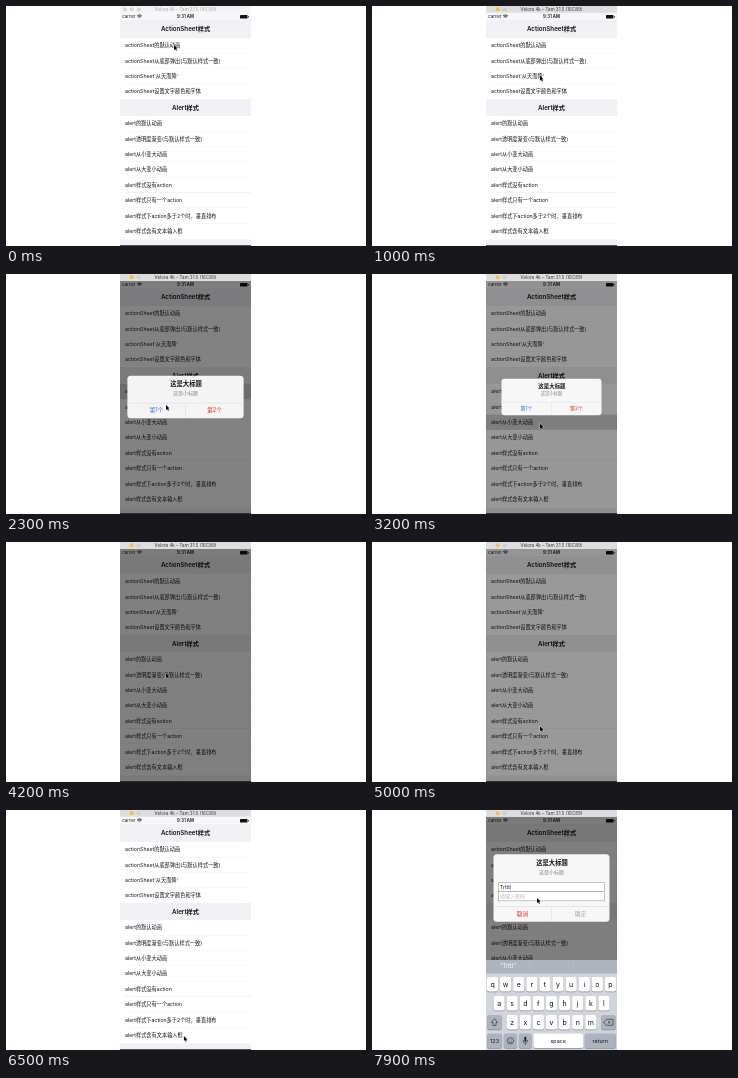
Recreate the animation shown at these times as an HTML page with a canvas. Size 360 px wide and 240 px high, loop 8000 ms.

```html
<!DOCTYPE html>
<html lang="zh">
<head>
<meta charset="utf-8">
<style>
html, body { margin: 0; width: 100%; height: 100%; overflow: hidden; background: #fff; }
canvas { display: block; width: 360px; height: 240px; }
</style>
</head>
<body>
<canvas></canvas>
<script>
const LOOP = 8000, STEP = 100, OPEN = 350, CLOSE = 170;
const L = 114, W = 131, R = L + W, MID = 179.5, ROW = 15.35;
const BLUE = '#2f6fe8', RED = '#f02a20', BLACK = '#111', GRAY = '#888', RULE = '#d4d4d4';
const FONT = 'Inter, "Noto Sans CJK SC", "Noto Sans CJK", sans-serif';
const ZOOM = 10; // large glyphs scaled down keep fractional spacing

const canvas = document.querySelector('canvas'), c = canvas.getContext('2d');
const dpr = window.devicePixelRatio || 1;
canvas.width = 360 * dpr;
canvas.height = 240 * dpr;

const clamp = v => Math.max(0, Math.min(1, v));
const easeOut = p => 1 - (1 - p) ** 2;
const smooth = p => p * p * (3 - 2 * p);

const sections = [
  { y: 14, head: 18, title: 'ActionSheet样式', rows: ['actionSheet的默认动画', 'actionSheet从底部弹出(与默认样式一致)',
    "actionSheet'从天而降'", 'actionSheet设置文字颜色和字体'] },
  { y: 93, head: 17, title: 'Alert样式', rows: ['alert的默认动画', 'alert透明度渐变(与默认样式一致)', 'alert从小变大动画',
    'alert从大变小动画', 'alert样式没有action', 'alert样式只有一个action',
    'alert样式下action多于2个时，垂直排布', 'alert样式含有文本输入框'] },
  { y: 233.6, head: 18, title: '自定义视图', rows: [] }
];
const rowTops = sections.flatMap(s => s.rows.map((_, i) => s.y + s.head + i * ROW));

// One demo per row: sheets slide, alerts scale in from the given size.
const demos = [
  { sheet: true }, { sheet: true }, { sheet: true, top: true }, { sheet: true, styled: true },
  { from: 1.1, buttons: 2 }, { from: 1, buttons: 2 }, { from: 0.25, solid: true, buttons: 2 }, { from: 1.4, buttons: 2 },
  { from: 1.1, buttons: 0 }, { from: 1.1, buttons: 1 }, { from: 1.1, buttons: 4 }, { from: 1.1, buttons: 2, form: true }
];
// Rows are pressed in order, at a slower pace from the seventh on.
const pressTime = i => 500 * Math.min(i, 6) + 720 * Math.max(0, i - 6);
demos.forEach((d, i) => {
  d.row = i;
  d.on = pressTime(i);
  d.tap = d.on + 0.62 * (pressTime(i + 1) - d.on);
  d.off = d.form ? LOOP : d.tap;
  d.press = [d.form ? 178 : 168, rowTops[i] + (d.sheet ? 7 : 9)];
  if (d.sheet) d.target = [178, 231];
  else if (d.form) d.target = [165, 88];
  else d.target = d.buttons > 1 ? [160, 131] : d.press; // a tap outside closes the others
});

function text(s, x, y, size, color = BLACK, align = 'center', weight = 400) {
  c.save();
  c.translate(x, y);
  c.scale(1 / ZOOM, 1 / ZOOM);
  c.font = `${weight} ${size * ZOOM}px ${FONT}`;
  c.textAlign = align;
  c.textBaseline = 'middle';
  c.fillStyle = color;
  c.fillText(s, 0, 0);
  const width = c.measureText(s).width / ZOOM;
  c.restore();
  return width;
}
function box(x, y, w, h, color, r = 0) {
  c.fillStyle = color;
  c.beginPath();
  c.roundRect(x, y, w, h, r);
  c.fill();
}
function dot(x, y, r, color) {
  c.fillStyle = color;
  c.beginPath();
  c.arc(x, y, r, 0, 7);
  c.fill();
}
function outline(d, x, y, width = 0.6) {
  c.save();
  c.translate(x, y);
  c.strokeStyle = '#222';
  c.lineWidth = width;
  c.stroke(new Path2D(d));
  c.restore();
}

function drawTitleBar(active) {
  box(L, 0, W, 6.8, active ? '#dedede' : '#f4f4f4');
  const lights = active ? ['#e2dcdc', '#fdbe41', '#cfcfcf'] : Array(3).fill('#d6d6d6');
  lights.forEach((color, i) => dot(118.7 + i * 7, 3.2, 2, color));
  text('Velora 4k – Tam 31.5 (16C89)', MID, 3.5, 4.5, active ? '#333' : '#aaa');
}

function drawStatus() {
  box(L, 6.8, W, 7.2, '#f7f7f9');
  text('Carrier', 116, 10.8, 4.1, BLACK, 'left');
  c.strokeStyle = BLACK;
  c.lineWidth = 0.7;
  for (const r of [1.2, 2.4, 3.5]) {
    c.beginPath();
    c.arc(133.5, 12.4, r, -2.35, -0.8);
    c.stroke();
  }
  text('9:31 AM', MID, 10.8, 4.3, BLACK, 'center', 600);
  box(234, 9, 7.5, 3.6, BLACK, 0.7);
  box(242, 10.1, 0.7, 1.4, BLACK);
}

function drawList(selected) {
  box(L, 14, W, 226, '#fff');
  let index = 0;
  for (const { y, head, title, rows } of sections) {
    box(L, y, W, head, '#f0f0f5');
    text(title, MID, y + head / 2 + 0.3, 6.2, BLACK, 'center', 600);
    rows.forEach((label, i) => {
      const top = rowTops[index];
      if (index++ === selected) box(L, top, W, ROW, '#d4d4d6');
      text(label, 119, top + ROW / 2 + 0.2, 5.2, BLACK, 'left');
      if (i < rows.length - 1) box(119, top + ROW - 0.4, R - 119, 0.3, '#e6e6e9');
    });
  }
}

function drawSheet(d, shown) {
  const head = d.styled ? 38.5 : 24, h = head + 68.5, mid = W / 2;
  c.save();
  c.translate(L, d.top ? 7 - h * (1 - shown) : 240 - h * shown);
  box(0, 0, W, h, '#fafafa');
  if (d.styled) {
    text('这是大标题', mid, 14.8, 17.3, '#f8231c');
    text('这是小标题', mid, 30.5, 4.6, '#5b87e8');
  } else {
    text('这是大标题', mid, 8.5, 6.3, BLACK, 'center', 600);
    text('这是小标题', mid, 17, 5, GRAY);
  }
  const colors = d.styled ? [BLACK, '#ef9140', BLACK] : [BLUE, RED, BLUE];
  colors.forEach((color, i) => {
    const y = head + i * 16;
    box(0, y, W, 0.4, RULE);
    text(`第${i + 1}个`, mid, y + 8.4, d.styled && i < 2 ? 4.1 : 6, color);
  });
  box(0, head + 48, W, 3.5, '#e2e2e4');
  text('取消', mid, head + 60, 6, d.styled ? BLACK : RED);
  c.restore();
}

const keyboardShown = (d, t) => smooth(clamp((t - d.on - 200) / 300));
const typed = (d, t) => 'Trttt'.slice(0, Math.max(0, Math.floor((t - d.on - 600) / 120)));

function drawFields(s) {
  for (const y of [28, 37.3]) {
    box(-53, y, 106, 9.3, '#fff');
    c.strokeStyle = '#8a8a8a';
    c.lineWidth = 0.5;
    c.strokeRect(-53, y, 106, 9.3);
  }
  const width = text(s || '请输入用户名', -51.5, 33, 5, s ? BLACK : '#bbb', 'left');
  box(-51.2 + (s ? width : 0), 30, 0.6, 5.6, '#4a6ee0');
  text('请输入密码', -51.5, 42.3, 5, '#bbb', 'left');
}

function drawAlert(d, t, shown) {
  const n = d.buttons, stacked = n > 2;
  const body = d.form ? 52 : 27, h = body + (stacked ? n * 15 : n ? 15.5 : 0);
  const scale = d.from + (1 - d.from) * shown;
  c.save();
  c.translate(MID, 123 - (d.form ? 45 * keyboardShown(d, t) : 0));
  c.scale(scale, scale);
  c.translate(0, -h / 2);
  if (!d.solid) c.globalAlpha *= shown;
  box(-58, 0, 116, h, '#f7f7f7', 3.5);
  text('这是大标题', 0.5, 8.6, 6.3, BLACK, 'center', 600);
  text('这是小标题', 0, 17.8, 5, GRAY);
  if (d.form) drawFields(typed(d, t));
  for (let i = 0; i < n; i++) {
    const y = body + (stacked ? i * 15 : 0);
    const x = n === 2 ? i * 58 - 29 : 0;
    if (stacked || !i) box(-58, y, 116, 0.4, RULE);
    const label = d.form ? ['取消', '确定'][i] : `第${i + 1}个`;
    const color = d.form ? [RED, '#aaa'][i] : i === 1 ? RED : BLUE;
    text(label, x, y + 7.9, 5.8, color);
  }
  if (n === 2) box(-0.2, body, 0.4, 15.5, RULE);
  c.restore();
}

function drawKey(x, y, w, label, dark, size = 7) {
  box(x, y + 0.7, w, 14.6, '#898c91', 1.8);
  box(x, y, w, 14.6, dark ? '#acb3be' : '#fff', 1.8);
  text(label, x + w / 2, y + 7.7, size);
}

function drawKeyboard(d, t) {
  c.save();
  c.translate(0, 90 * (1 - keyboardShown(d, t)));
  box(L, 150, W, 90, '#d1d5db');
  box(L, 150, W, 13.5, '#aeb4bd');
  const s = typed(d, t);
  if (s) text(`“${s}”`, 136, 156.8, 5.6, '#fff');
  for (const x of [157.5, 201.5]) box(x, 152.5, 0.4, 8.5, '#c6cbd2');
  ['qwertyuiop', 'asdfghjkl', 'zxcvbnm'].forEach((keys, r) => {
    const left = MID - keys.length * 6.55 + 1;
    [...keys].forEach((k, i) => drawKey(left + i * 13.1, 167 + r * 19, 11.1, k));
  });
  drawKey(115.3, 205, 14.5, '', true);
  outline('M-3.2 0L0-3.8L3.2 0H1.5V3H-1.5V0Z', 122.5, 212.5);
  drawKey(229.2, 205, 14.5, '', true);
  outline('M-5 0L-2.4-3H4.3V3H-2.4ZM-.8-1.3L1.8 1.3M1.8-1.3L-.8 1.3', 236.7, 212.3);
  drawKey(115.3, 223.5, 14.5, '123', true, 5.4);
  drawKey(131.8, 223.5, 13.2, '', true);
  outline('M-3.2 0A3.2 3.2 0 1 1 3.2 0A3.2 3.2 0 1 1-3.2 0ZM-1.6.9Q0 2.6 1.6.9M-1.2-1.3V-.5M1.2-1.3V-.5', 138.4, 230.8);
  drawKey(146.9, 223.5, 12.7, '', true);
  box(152.3, 226.7, 2, 5, '#222', 1);
  outline('M-2.3 0Q-2 3.2 0 3.3Q2 3.2 2.3 0M0 3.3V5', 153.3, 230);
  drawKey(161.4, 223.5, 49.6, 'space', false, 5.4);
  drawKey(212.8, 223.5, 30.9, 'return', true, 5.4);
  c.restore();
}

// The pointer rests after each click, then hops to the next spot.
function pointerAt(t) {
  const d = demos.findLast(d => t >= d.on), next = demos[d.row + 1];
  const inside = t < d.tap || !next;
  const [from, to, a, b, wait] = inside
    ? [d.press, d.target, d.on, d.tap, 0.6]
    : [d.target, next.press, d.tap, next.on, 0.3];
  const p = smooth(clamp(((t - a) / (b - a) - wait) / 0.35));
  return from.map((v, i) => v + (to[i] - v) * p);
}

function drawPointer(t) {
  const arrow = new Path2D('M0 0V5L1.2 4L2 5.8L2.9 5.4L2.1 3.6H3.6Z');
  c.save();
  c.translate(...pointerAt(t));
  c.strokeStyle = '#fff';
  c.lineWidth = 0.6;
  c.stroke(arrow);
  c.fillStyle = '#000';
  c.fill(arrow);
  c.restore();
}

function draw(t) {
  c.setTransform(dpr, 0, 0, dpr, 0, 0);
  box(0, 0, 360, 240, '#fff');
  c.save();
  c.beginPath();
  c.rect(L, 0, W, 240);
  c.clip();
  const d = demos.findLast(d => t >= d.on);
  const opened = easeOut(clamp((t - d.on) / OPEN)), gone = clamp((t - d.off) / CLOSE);
  drawList(opened && !gone ? d.row : -1);
  drawStatus();
  box(L, 239.2, W, 0.8, '#222');
  box(L, 6.8, W, 234, `rgba(0,0,0,${0.5 * opened * (1 - gone ** 4)})`);
  if (d.sheet) drawSheet(d, opened * (1 - smooth(gone)));
  else {
    c.globalAlpha = clamp(1 - gone * 6);
    drawAlert(d, t, opened);
    c.globalAlpha = 1;
  }
  if (d.form) drawKeyboard(d, t);
  drawTitleBar(t >= STEP);
  drawPointer(t);
  c.restore();
}

const start = performance.now();
function tick() {
  const t = (performance.now() - start) % LOOP;
  draw(Math.floor(t / STEP) * STEP);
  requestAnimationFrame(tick);
}
tick();
</script>
</body>
</html>
```
